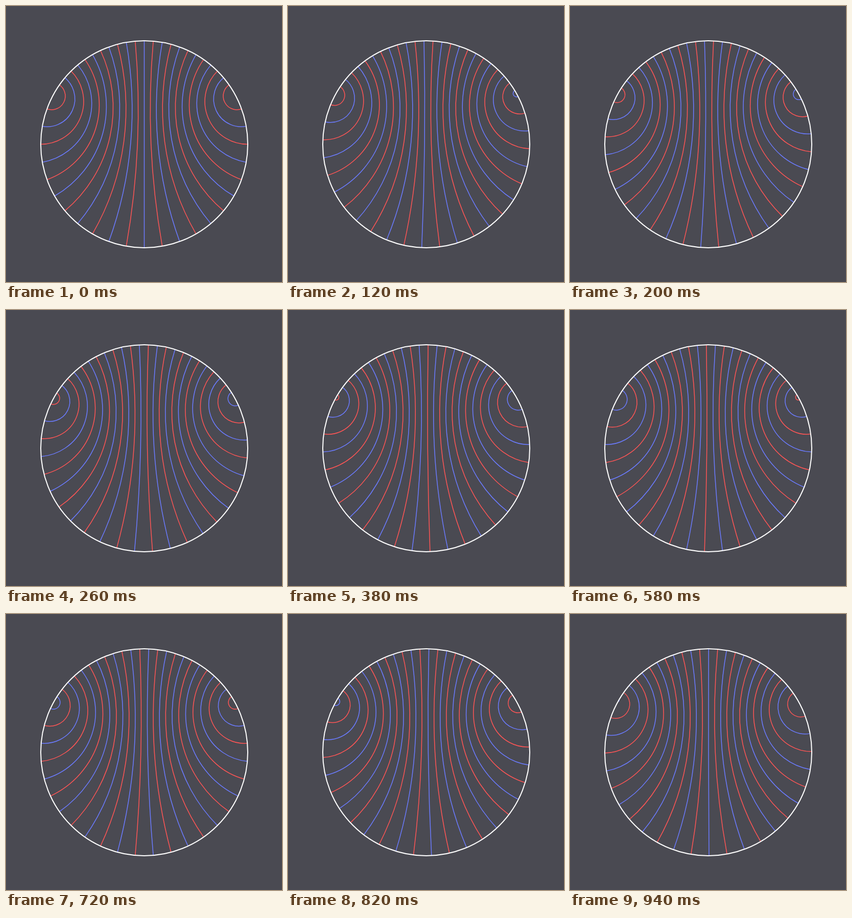
Write an HTML page with a canvas that moves like this. It is 540 px wide and 540 px high and loops after 0.96 s.

```html
<!DOCTYPE html>
<html lang="en">
<head>
<meta charset="utf-8">
<title>Geodesics in a disk</title>
<style>
  html, body { margin: 0; width: 100%; height: 100%; overflow: hidden; background: #4a4a52; }
  canvas { display: block; }
</style>
</head>
<body>
<canvas id="stage" width="540" height="540"></canvas>
<script>
const ctx = document.getElementById('stage').getContext('2d');
const LOOP = 960, STEP = 20;
const CENTER = 270.5, RADIUS = 202.5;
const BLUE = '#6b7bff', RED = '#ff5555';
const rad = deg => deg * Math.PI / 180;

// Point on the rim, measured clockwise from the top.
const rim = deg => [
  CENTER + RADIUS * Math.sin(rad(deg)),
  CENTER - RADIUS * Math.cos(rad(deg))
];

// Circular arc meeting the rim at right angles: both end tangents aim at the center.
function drawGeodesic(angle, color) {
  const start = rim(angle), end = rim(180 - 2 * angle);
  const halfGap = 90 - 1.5 * Math.abs(angle);
  ctx.beginPath();
  ctx.moveTo(...start);
  if (Math.abs(angle) > 0.01) {
    ctx.arcTo(CENTER, CENTER, ...end, RADIUS * Math.tan(rad(halfGap)));
  }
  ctx.lineTo(...end);
  ctx.strokeStyle = color;
  ctx.lineWidth = 1.5;
  ctx.stroke();
}

function draw(time) {
  const shift = 10 * Math.floor(time % LOOP / STEP) * STEP / LOOP;
  ctx.fillStyle = '#4a4a52';
  ctx.fillRect(0, 0, 540, 540);
  for (let k = -12; k <= 14; k++) {
    const angle = 5 * k - shift;
    if (Math.abs(angle) < 59.99) drawGeodesic(angle, k % 2 ? RED : BLUE);
  }
  ctx.beginPath();
  ctx.arc(CENTER, CENTER, RADIUS, 0, 2 * Math.PI);
  ctx.strokeStyle = '#fff';
  ctx.lineWidth = 2;
  ctx.stroke();
}

const begin = performance.now();
function tick() {
  draw(performance.now() - begin);
  requestAnimationFrame(tick);
}
tick();
</script>
</body>
</html>
```
